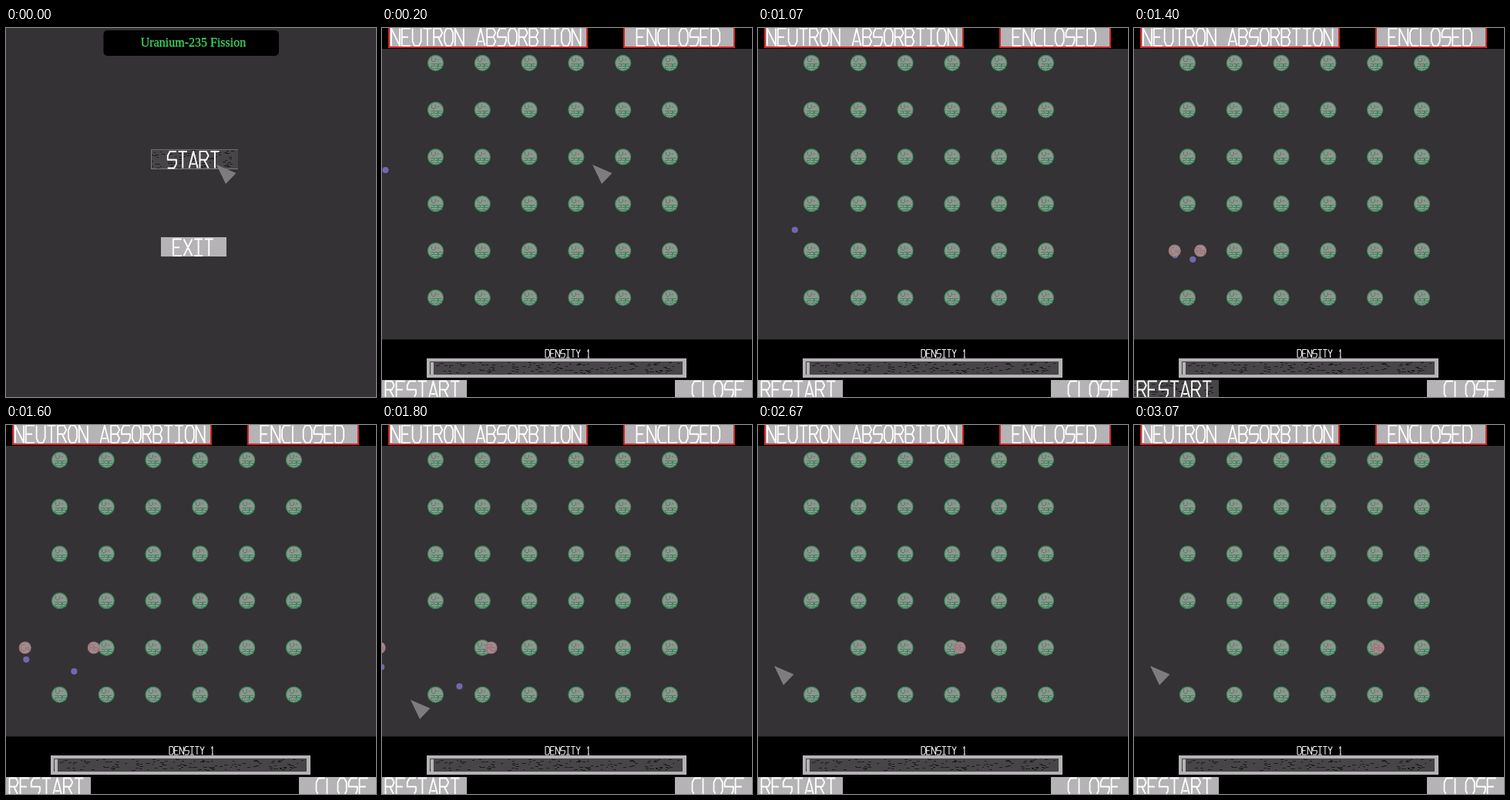
Write an HTML page with a canvas that moves like this. It is 480x478 px and loops after 3.14 s.

```html
<!DOCTYPE html>
<html lang="en">
<head>
<meta charset="utf-8">
<title>Uranium-235 Fission</title>
<style>
html, body { margin: 0; width: 100%; height: 100%; overflow: hidden; background: #343234; }
canvas { display: block; width: 480px; height: 478px; }
</style>
</head>
<body>
<canvas id="stage" width="480" height="478"></canvas>
<script>
const ctx = document.getElementById('stage').getContext('2d');
const LOOP = 3140, MENU = 200, STEP = 200 / 3;
const HIT = 1280, FIELD = '#343234', PLATE = '#b5b3b5';
const ATOM = { x: 69.5, y: 45.3, gap: 60.8, n: 6 };

// Stroke letters on a 5 x 5 lattice, points named a to y row by row.
const GLYPHS = {
  A: 'ucy qs', B: 'uadjnk ntxu', C: 'edbfpvxy', D: 'uadjtxu', E: 'eauy kn',
  I: 'ae cw uy', L: 'auy', N: 'uaye', O: 'bdjtxvpfb', R: 'uadjnk my', S: 'edbfkotxu',
  T: 'ae cw', U: 'apvxte', X: 'ay eu', Y: 'amw em', s: 'okpty', b: 'auyok',
  1: 'gcw vx', 2: 'aeokuy', 3: 'aeyu ko', 5: 'eakoyu', '-': 'ln'
};

// Cursor tip: time, x, y
const MOUSE = [
  [200, 273, 177], [670, 107, 310], [1130, 60, 462],
  [1530, 62, 466], [1800, 37, 356], [2130, 21, 312]
];

function label(str, x, y, h, pitch, color, width) {
  const w = pitch * 0.8;
  ctx.strokeStyle = color;
  ctx.lineWidth = width;
  ctx.lineJoin = 'round';
  ctx.beginPath();
  [...str].forEach((ch, i) => {
    for (const line of (GLYPHS[ch] || '').split(' ')) {
      [...line].forEach((p, k) => {
        const n = p.charCodeAt(0) - 97;
        const px = x + i * pitch + (n % 5) * w / 4;
        const py = y + Math.floor(n / 5) * h / 4;
        if (k) ctx.lineTo(px, py); else ctx.moveTo(px, py);
      });
    }
  });
  ctx.stroke();
}

function rect(x, y, w, h, color) {
  ctx.fillStyle = color;
  ctx.fillRect(x, y, w, h);
}

function disc(x, y, r, fill, ring, width) {
  ctx.beginPath();
  ctx.arc(x, y, r, 0, Math.PI * 2);
  ctx.fillStyle = fill;
  ctx.fill();
  if (!ring) return;
  ctx.strokeStyle = ring;
  ctx.lineWidth = width;
  ctx.stroke();
}

function darkPlate(x, y, w, h) {
  rect(x, y, w, h, '#474547');
  let seed = 7;
  const rnd = () => (seed = seed * 16807 % 2147483647) / 2147483647;
  for (let i = 0; i < w * h / 40; i++) {
    const dx = rnd() * (w - 5), dy = 1 + rnd() * (h - 3);
    rect(x + Math.round(dx), y + Math.round(dy), 2 + Math.round(rnd() * 3), 1, '#1d1c1d');
  }
}

function cursor(x, y) {
  ctx.beginPath();
  ctx.moveTo(x, y);
  ctx.lineTo(x + 25.5, y + 11);
  ctx.lineTo(x + 12, y + 25);
  ctx.closePath();
  ctx.fillStyle = '#7e7c7e';
  ctx.fill();
}

function mouseAt(t) {
  for (let i = 1; i < MOUSE.length; i++) {
    const [t0, x0, y0] = MOUSE[i - 1], [t1, x1, y1] = MOUSE[i];
    if (t <= t1) {
      const k = Math.max(0, (t - t0) / (t1 - t0));
      return [x0 + (x1 - x0) * k, y0 + (y1 - y0) * k];
    }
  }
  return MOUSE[MOUSE.length - 1].slice(1);
}

function atom(x, y) {
  disc(x, y, 10, '#929492', '#348f5a', 1.2);
  const tx = Math.round(x) + 0.5, ty = Math.round(y) + 0.5;
  label('U-', tx - 6, ty - 7, 5, 6, '#348a58', 1);
  label('235', tx - 7, ty + 1, 6, 5, '#348a58', 1);
}

function fragment(name, x, y) {
  disc(x, y, 7.5, '#969092', '#a8727a', 1.1);
  label(name, x - 5, y - 4, 8, 5.8, '#b4606a', 0.9);
}

function neutron(x, y) {
  disc(x, y, 4.1, '#7068b0');
}

function menu() {
  ctx.fillStyle = '#000';
  ctx.beginPath();
  ctx.roundRect(126.5, 3, 227.5, 33, 5);
  ctx.fill();
  ctx.fillStyle = ctx.strokeStyle = '#3fdc62';
  ctx.lineWidth = 0.3;
  ctx.font = '16px "Liberation Serif", "Times New Roman", serif';
  ctx.textAlign = 'center';
  ctx.fillText('Uranium-235 Fission', 243, 24);
  ctx.strokeText('Uranium-235 Fission', 243, 24);
  darkPlate(188, 157, 113, 26);
  rect(188, 157, 1, 26, '#7c7a7c');
  rect(188, 157, 113, 1, '#6c6a6c');
  rect(188, 182, 113, 1, '#7c7a7c');
  label('START', 209.8, 160, 21.5, 13.9, '#fff', 1.9);
  rect(201, 271, 85, 25, PLATE);
  label('EXIT', 217, 273.5, 21.5, 13.6, '#fff', 1.9);
  cursor(MOUSE[0][1], MOUSE[0][2]);
}

function toggle(text, x, w, tx) {
  rect(x, -4, w, 30, '#cf2428');
  rect(x + 2, -4, w - 4, 28, PLATE);
  label(text, tx, 0.5, 22.5, 13.8, '#fff', 1.8);
}

function panels(hover) {
  rect(0, 0, 480, 27, '#000');
  rect(0, 403.5, 480, 75, '#000');
  toggle('NEUTRON ABSORBTION', 8, 259, 12);
  toggle('ENCLOSED', 313, 145, 330.5);
  label('DENSITY 1', 212, 416.5, 10.5, 6.65, '#f4f4f4', 1.1);
  rect(58, 428, 337, 25, PLATE);
  darkPlate(62, 432, 328, 17);
  rect(63, 433, 4, 16, PLATE);
  if (hover) darkPlate(0, 456, 110, 22);
  else rect(0, 456, 110, 22, PLATE);
  label('RESTART', 4.5, 457.5, 22, 14.1, '#fff', 1.8);
  rect(380, 456, 100, 22, PLATE);
  label('CLOSE', 402.5, 457.5, 22, 14, '#fff', 1.8);
}

function reactor(t) {
  const split = t >= HIT;
  const cx = ATOM.x, cy = ATOM.y + 4 * ATOM.gap;
  for (let r = 0; r < ATOM.n; r++) {
    for (let c = 0; c < ATOM.n; c++) {
      if (split && r === 4 && c === 0) continue;
      atom(ATOM.x + c * ATOM.gap, ATOM.y + r * ATOM.gap);
    }
  }
  if (split) {
    const d = t - HIT;
    neutron(cx - 0.135 * d, cy + 0.048 * d);
    neutron(cx - 0.5 + 0.0605 * d, cy - 0.3 + 0.0968 * d);
    fragment('Cs', cx - 0.14 * d, cy);
    fragment('Rb', cx + 0.1385 * d, cy);
  } else {
    neutron(4.5 + 0.05 * (t - MENU), 184 + 0.0894 * (t - MENU));
  }
  const [mx, my] = mouseAt(t);
  cursor(mx, my);
  panels(my > 456 && mx < 110);
}

function frame() {
  const t = performance.now() % LOOP;
  rect(0, 0, 480, 478, FIELD);
  if (t < MENU) menu();
  else reactor(MENU + Math.floor((t - MENU + 4) / STEP) * STEP);
  requestAnimationFrame(frame);
}
frame();
</script>
</body>
</html>
```
